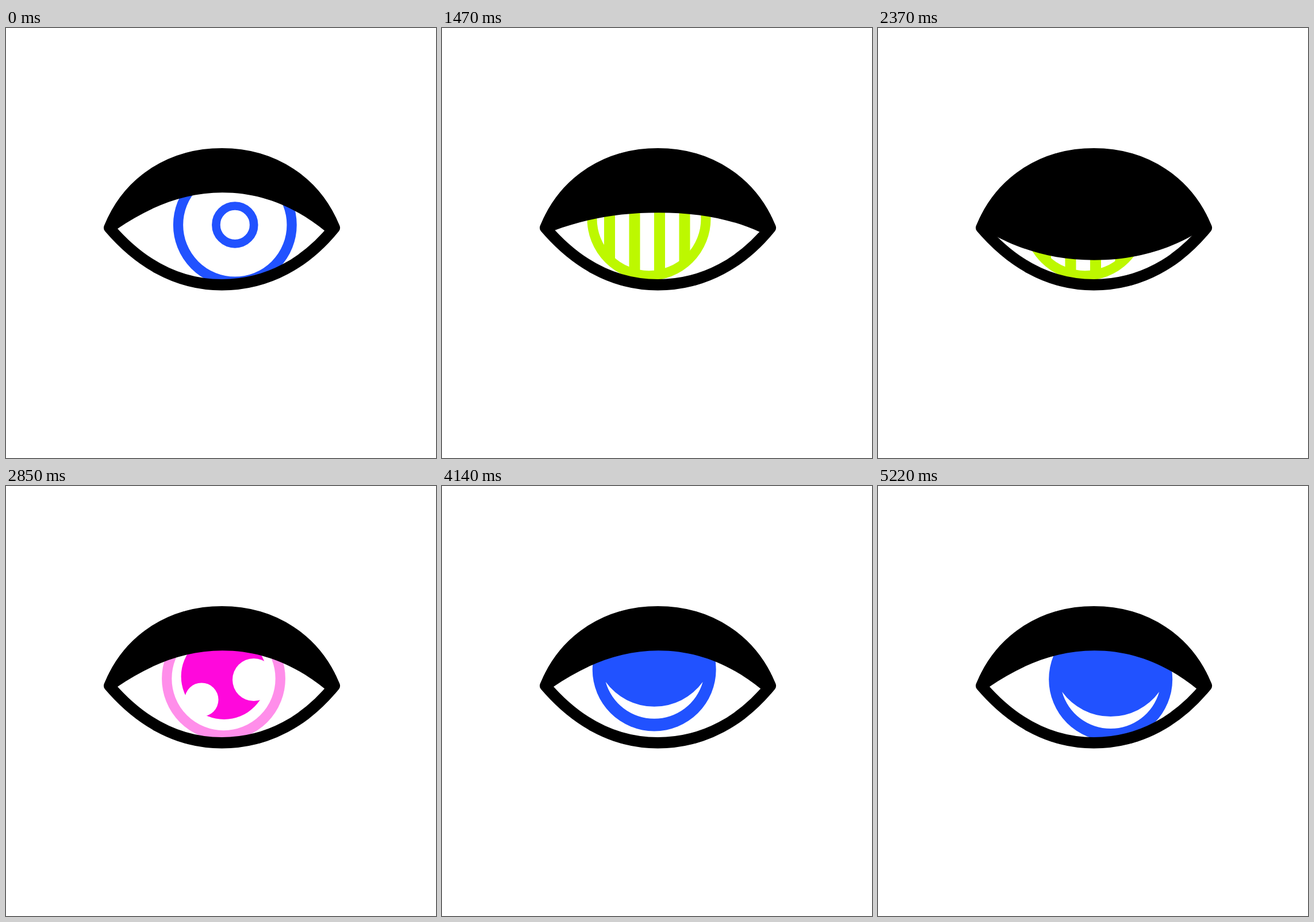
Write an HTML page that moves like this. It is 748 by 748 pixels and loops after 5400 ms.

```html
<!DOCTYPE html>
<html lang="en">
<head>
<meta charset="utf-8">
<title>Eye</title>
<style>
html, body { margin: 0; width: 100%; height: 100%; overflow: hidden; background: #fff; }
svg { display: block; width: 100%; height: 100%; }
</style>
</head>
<body>
<svg viewBox="0 0 748 748">
  <defs>
    <path id="almond" d="M179.8 347.5C212 268 285 218.7 375.5 218.7S539 268 571.3 347.5C523 407 457 446.8 375.5 446.8S229 405 179.8 347.5Z"/>
    <clipPath id="eyeClip"><use href="#almond"/></clipPath>
    <clipPath id="barClip"><circle r="99"/></clipPath>
    <clipPath id="discClip"><circle r="76"/></clipPath>
  </defs>
  <rect width="748" height="748" fill="#fff"/>
  <g clip-path="url(#eyeClip)">
    <g id="rings" fill="none" stroke="#2152ff">
      <circle r="98.8" stroke-width="17.3"/>
      <circle r="32.9" stroke-width="14.7"/>
    </g>
    <g id="bars" fill="none" stroke="#bdf800">
      <circle r="99" stroke-width="17"/>
      <path clip-path="url(#barClip)" stroke-width="19" d="M-68.5-99v198m43.5 0v-198m43.5 0v198m43.5 0v-198"/>
    </g>
    <g id="shiny">
      <circle r="98.8" fill="none" stroke="#ff8eea" stroke-width="17.3"/>
      <g transform="translate(.8 -3.7)">
        <circle r="74.7" fill="#ff08dc"/>
        <g clip-path="url(#discClip)" fill="#fff">
          <circle id="big" r="37"/>
          <circle id="small" r="29.3"/>
        </g>
      </g>
    </g>
    <g id="crescent">
      <circle r="107.5" fill="#2152ff"/>
      <path fill="#fff" d="M-84.5 21.8A87.8 87.8 0 0 0 84.5 21.8A104.5 104.5 0 0 1-84.5 21.8Z"/>
    </g>
    <path id="lid"/>
  </g>
  <use href="#almond" fill="none" stroke="#000" stroke-width="19.5" stroke-linejoin="round"/>
</svg>
<script>
const LOOP = 5400;
const BLINK = 360, SHUT_AT = 150, OPEN_AT = 180;
const BLINKS = [1200, 1740, 2250, 3590];
const $ = id => document.getElementById(id);
const mix = (a, b, u) => a + (b - a) * u;
const ramp = (t, from, to) => Math.min(1, Math.max(0, (t - from) / (to - from)));

// The gaze of each iris, in order of appearance.
const gaze = {
  rings(t) {
    const home = ramp(t, 990, 1110);
    return [398.3 + 34.7 * ramp(t, 0, 360) - 93.5 * ramp(t, 630, 750) + 39 * home,
      342.4 - 7 * home];
  },
  bars: () => [360, 331.7],
  shiny: () => [378.5, 335],
  crescent(t) {
    const left = ramp(t, 4110, 4470), right = ramp(t, 4830, 5220);
    return [373.8 - 55.3 * left + 86.2 * right, 317.9 + 13.1 * left + 5.2 * right];
  }
};

// The second blink leaves the iris as it is.
const swaps = BLINKS.filter((_, i) => i !== 1).map(b => b + (SHUT_AT + OPEN_AT) / 2);

function place(id, [x, y]) {
  $(id).setAttribute('transform', `translate(${x.toFixed(2)} ${y.toFixed(2)})`);
}

const polar = (r, a) => [r * Math.cos(a), r * Math.sin(a)];

function drawGlints(t) {
  const lead = 0.25 * (1 - ramp(t, 2670, 2850));
  const u = ramp(t, 2880, 3480);
  const swing = 0.5 * Math.sin(2 * Math.PI * u);
  place('big', polar(52 - 6 * u, 0.11 + 0.745 * u - swing + lead));
  place('small', polar(56.2 + 70 * u * u, 2.34 + 0.8 * u + lead));
}

// 0 is open, 1 is shut.
function closure(t) {
  const start = BLINKS.find(b => t >= b && t < b + BLINK);
  if (start === undefined) return 0;
  const d = t - start;
  return d < OPEN_AT
    ? Math.pow(ramp(d, 0, SHUT_AT), 1.4)
    : Math.pow(1 - ramp(d, OPEN_AT, BLINK), 2.2);
}

// Lower lid edge: two mirrored halves, the corners slightly tilted.
function drawLid(k) {
  const apex = mix(286.2, 446.8, k), mid = mix(376.5, 375.5, k);
  const tip = side => [374 + side * mix(182, 174, k), mix(352.2, 361, k) + 1.8 * side * (1 - k)];
  const shoulder = side => [mid + side * mix(126, 135, k), mix(310.5, 410, k)];
  const brow = side => [mid + side * mix(67, 78.5, k), apex];
  $('lid').setAttribute('d', `M179.8 347.5L${tip(-1)}C${shoulder(-1)} ${brow(-1)} ${mid} ${apex}` +
    `C${brow(1)} ${shoulder(1)} ${tip(1)}L571.3 347.5V200H179.8Z`);
}

function draw(t) {
  const current = swaps.filter(s => t >= s).length;
  Object.keys(gaze).forEach((id, i) => {
    $(id).style.display = i === current ? '' : 'none';
    place(id, gaze[id](t));
  });
  drawGlints(t);
  drawLid(closure(t));
}

let begin;
function tick(now) {
  begin ??= now;
  draw((now - begin) % LOOP);
  requestAnimationFrame(tick);
}
draw(0);
requestAnimationFrame(tick);
</script>
</body>
</html>
```
